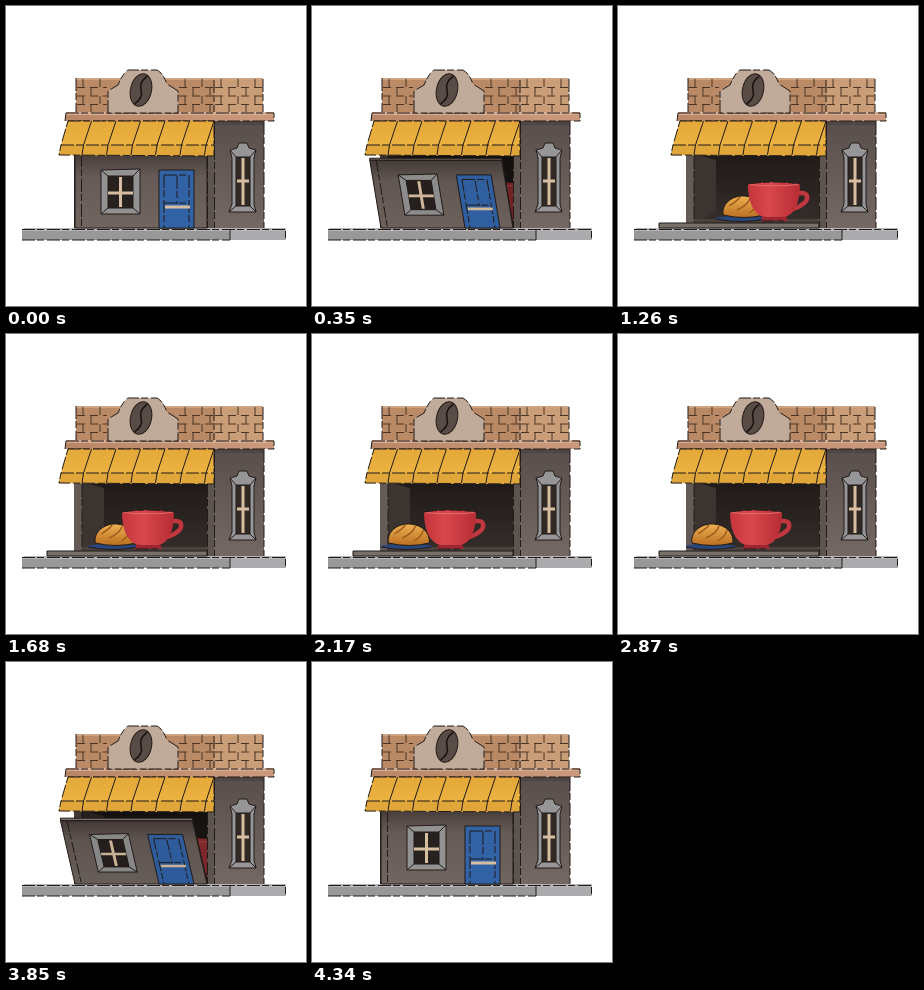
Animation, 300 px wide and 300 px high, one loop 4.62 s. Source, as an HTML page:

```html
<!DOCTYPE html>
<html lang="en">
<head>
<meta charset="utf-8">
<title>Coffee shop</title>
<style>
html, body { margin: 0; width: 100%; height: 100%; overflow: hidden; background: #fff; }
svg { display: block; width: 100vw; height: 100vh; }
.ink { stroke: #211b18; stroke-width: 1; stroke-linejoin: round; }
.line { fill: none; stroke: #211b18; stroke-width: 1; }
.rough { stroke-dasharray: 13 2 7 3; }
.wood { fill: none; stroke: #d8bea0; stroke-width: 3; }
</style>
</head>
<body>
<svg viewBox="0 0 300 300">
  <defs>
    <clipPath id="room"><path d="M68 146H201V222H68Z"/></clipPath>
    <linearGradient id="dark" x1="0" y1="0" x2="0" y2="1">
      <stop offset="0" stop-color="#1e1917"/><stop offset="1" stop-color="#372f2c"/>
    </linearGradient>
    <linearGradient id="wall" x1="0" y1="0" x2="0" y2="1">
      <stop offset="0" stop-color="#463c39"/><stop offset=".3" stop-color="#655a55"/><stop offset="1" stop-color="#70655f"/>
    </linearGradient>
    <linearGradient id="wing" x1="0" y1="0" x2="0" y2="1">
      <stop offset="0" stop-color="#584e4b"/><stop offset="1" stop-color="#746863"/>
    </linearGradient>
    <linearGradient id="red" x1="0" y1="0" x2="1" y2="0">
      <stop offset="0" stop-color="#c4363c"/><stop offset=".4" stop-color="#d8474b"/><stop offset="1" stop-color="#b72d35"/>
    </linearGradient>
    <linearGradient id="crust" x1="0" y1="0" x2="0" y2="1">
      <stop offset="0" stop-color="#eeb052"/><stop offset="1" stop-color="#b96f20"/>
    </linearGradient>
    <linearGradient id="cloth" x1="0" y1="0" x2="0" y2="1">
      <stop offset="0" stop-color="#e3a838"/><stop offset="1" stop-color="#efb846"/>
    </linearGradient>
    <linearGradient id="ledge" x1="0" y1="0" x2="1" y2="0">
      <stop offset="0" stop-color="#b98767"/><stop offset="1" stop-color="#c99b7c"/>
    </linearGradient>
  </defs>

  <!-- pavement -->
  <path fill="#989899" d="M16 223H224V234H16Z"/>
  <path fill="#ababad" d="M224 223H280V234H224Z"/>
  <path fill="#b6b6b8" d="M18 222H280V225H16Z"/>
  <path class="line rough" d="M16 223.5H279.5V234M224 223V234M16 234H224"/>

  <!-- interior -->
  <path fill="url(#dark)" d="M68 146H208V222H68Z"/>
  <path fill="#3c3431" d="M76 148L98 154V206L76 217Z"/>
  <path fill="#4a413c" d="M76 213H201V222H68Z"/>
  <path fill="#655b56" d="M68 148H76V217L68 222Z"/>
  <path class="line rough" d="M76 150V216"/>

  <g clip-path="url(#room)">
    <g id="bread">
      <ellipse cx="92" cy="212.5" rx="26" ry="2.6" fill="#28477f"/>
      <path class="line" stroke-width=".7" d="M67 213Q92 218 117 213"/>
      <path class="ink" fill="url(#crust)" d="M74 209C72 198 83 189 96 190C108 191 116 199 115 209Q95 214 74 209Z"/>
      <path fill="none" stroke="#9c5c1d" stroke-width="1.4" d="M80 200Q88 195 91 191M88 204Q99 199 101 192M100 207Q107 203 109 196"/>
    </g>
    <g id="cup">
      <path fill="none" stroke="#c0373f" stroke-width="4.5" d="M160 188C174 183 177 197 157 203"/>
      <path fill="#9d2730" d="M127 209H150L152 215H125Z"/>
      <path fill="url(#red)" d="M112 178Q138 174 164 178C164 200 157 211 146 211H131C119 211 112 198 112 178Z"/>
      <path fill="none" stroke="#e66b6c" stroke-width="1.2" d="M113 178.5Q138 181 163 178.5"/>
      <path class="line rough" stroke-width=".8" d="M112 178Q138 174 164 178M126 215H151"/>
    </g>
    <path id="gloom" d="M68 146H201V222H68Z"/>
  </g>
  <path fill="#5d5450" d="M201 146H209V222H201Z"/>
  <path class="line rough" d="M201.5 150V222"/>

  <!-- folding front -->
  <path id="rim" class="ink" fill="#77706b"/>
  <g id="front">
    <path class="ink" fill="url(#wall)" d="M69 148H201V222H69Z"/>
    <path class="line rough" d="M75.5 148V222"/>
    <path class="ink" fill="#929293" d="M95 164L134 163V208H95Z"/>
    <path class="ink" fill="#27211f" d="M102 170H127V202H102Z"/>
    <path class="line rough" d="M95 164L102 170M134 163L127 170M95 208L102 202M134 208L127 202"/>
    <path class="wood" d="M114.5 171V201M102 187H127"/>
    <path class="ink" fill="#3263a6" d="M153 164H188V222H153Z"/>
    <path class="line rough" d="M158 169V222M183 169V222M158 169H183M171 170V198M158 197H183"/>
    <path class="wood" stroke-width="2.500" d="M159 201H184"/>
    <path id="shade" d="M68.500 147.500H201.500V222H68.500Z"/>
  </g>

  <!-- right wing -->
  <path fill="url(#wing)" d="M208 114H258V222H208Z"/>
  <path fill="#4f4643" d="M208 114H258V119H208Z"/>
  <path class="line rough" d="M208.500 116V222M258 116V222"/>
  <path class="ink" fill="#969698" d="M224 144L231 142L233 137H241L243 142L250 144L248 152V198L250 206H223L226 198V152Z"/>
  <path class="ink" fill="#302926" d="M230 151H244V200H230Z"/>
  <path class="wood" d="M237 152V199M231 175H243"/>
  <path class="line rough" d="M224 144L230 151M250 144L244 151M223 206L230 200M250 206L244 200"/>

  <!-- roof -->
  <path fill="#b98a65" d="M70 72H208V107H70Z"/>
  <path fill="#c99d78" d="M208 72H257V107H208Z"/>
  <path fill="#cda381" d="M70 72H257V74H70Z"/>
  <path id="bricks" fill="none" stroke="#4a3427" stroke-width="1" stroke-dasharray="8 5"/>
  <path class="line rough" d="M70 72V107M208 74V107M257 73V107"/>
  <path fill="url(#ledge)" d="M60 107H268V115H59Z"/>
  <path fill="#d6ad90" d="M60 106H268V109H60Z"/>
  <path class="line rough" d="M60 107H268V115H59Z"/>
  <path class="ink rough" fill="#c0aa9a" d="M102 107V85L112 79Q117 67 122 64H151Q157 67 161 78L172 85V107Z"/>
  <g transform="rotate(13 135 84)">
    <ellipse class="ink" cx="135" cy="84" rx="10.500" ry="16.500" fill="#594b45"/>
    <path fill="none" stroke="#17110f" stroke-width="1.500" d="M138 69Q131 77 135 84T132 99"/>
  </g>

  <!-- awning -->
  <path fill="url(#cloth)" d="M62 115H208V150L53 149L55 139Z"/>
  <path fill="#e0a63a" d="M55 139H208V150L53 149Z"/>
  <path id="slats" class="line"/>
  <path class="line rough" d="M62 115H208V150L53 149L55 139L62 115M55 139H208"/>
</svg>
<script>
const LOOP = 4620, STEP = 70, LEAVE = 2870, SHUT = 4340;
const $ = id => document.getElementById(id);
const set = (id, name, value) => $(id).setAttribute(name, value);

// Smooth 0 to 1 between two times.
function ease(t, from, to) {
  const u = Math.min(1, Math.max(0, (t - from) / (to - from)));
  return u * u * (3 - 2 * u);
}

function brickPath(left, right) {
  let d = '';
  for (let row = 0; row < 4; row++) {
    const y = 73 + row * 8.5;
    if (row) d += `M${left} ${y}H${right}`;
    for (let x = left + 6 + (row % 2) * 8; x < right; x += 17) d += `M${x} ${y}v8`;
  }
  return d;
}

function slatPath() {
  let d = '';
  for (let i = 1; i < 7; i++) {
    const low = 53 + i * 24.5;
    d += `M${low + 8} 115L${low} 139L${low - 1.5} 149`;
  }
  return d;
}

function draw(t) {
  const open = ease(t, 0, 1040) - ease(t, 3105, SHUT);
  const angle = (1 - open) * Math.PI / 2;
  const sin = Math.sin(angle), cos = Math.cos(angle);
  const lean = 28 * cos, top = 222 - 74 * sin, rim = 5 * cos;

  set('front', 'transform',
    `matrix(1 0 ${lean / 74} ${sin} ${-3 * lean} ${222 - 222 * sin})`);
  $('front').style.display = sin < .01 ? 'none' : '';
  set('shade', 'opacity', .58 * open ** 2);
  set('gloom', 'opacity', .6 * (1 - open));
  $('rim').style.display = cos < .01 ? 'none' : '';
  set('rim', 'd',
    `M${69 - lean} ${top}V${top - rim}H${201 - lean}L201 ${222 - rim}V222L${201 - lean} ${top}Z`);

  const cupAway = 1 - ease(t, 0, 2000) + ease(t, LEAVE, 3965);
  const breadAway = 1 - ease(t, 0, 2450) + ease(t, LEAVE, SHUT);
  set('cup', 'transform', `translate(${58 * cupAway} 0)`);
  set('bread', 'transform', `translate(${65 * breadAway} 0)`);
}

set('bricks', 'd', brickPath(71, 101) + brickPath(173, 207) + brickPath(209, 256));
set('slats', 'd', slatPath());

const start = performance.now();
function tick() {
  const t = (performance.now() - start) % LOOP;
  draw(Math.floor(t / STEP) * STEP);
  requestAnimationFrame(tick);
}
tick();
</script>
</body>
</html>
```
